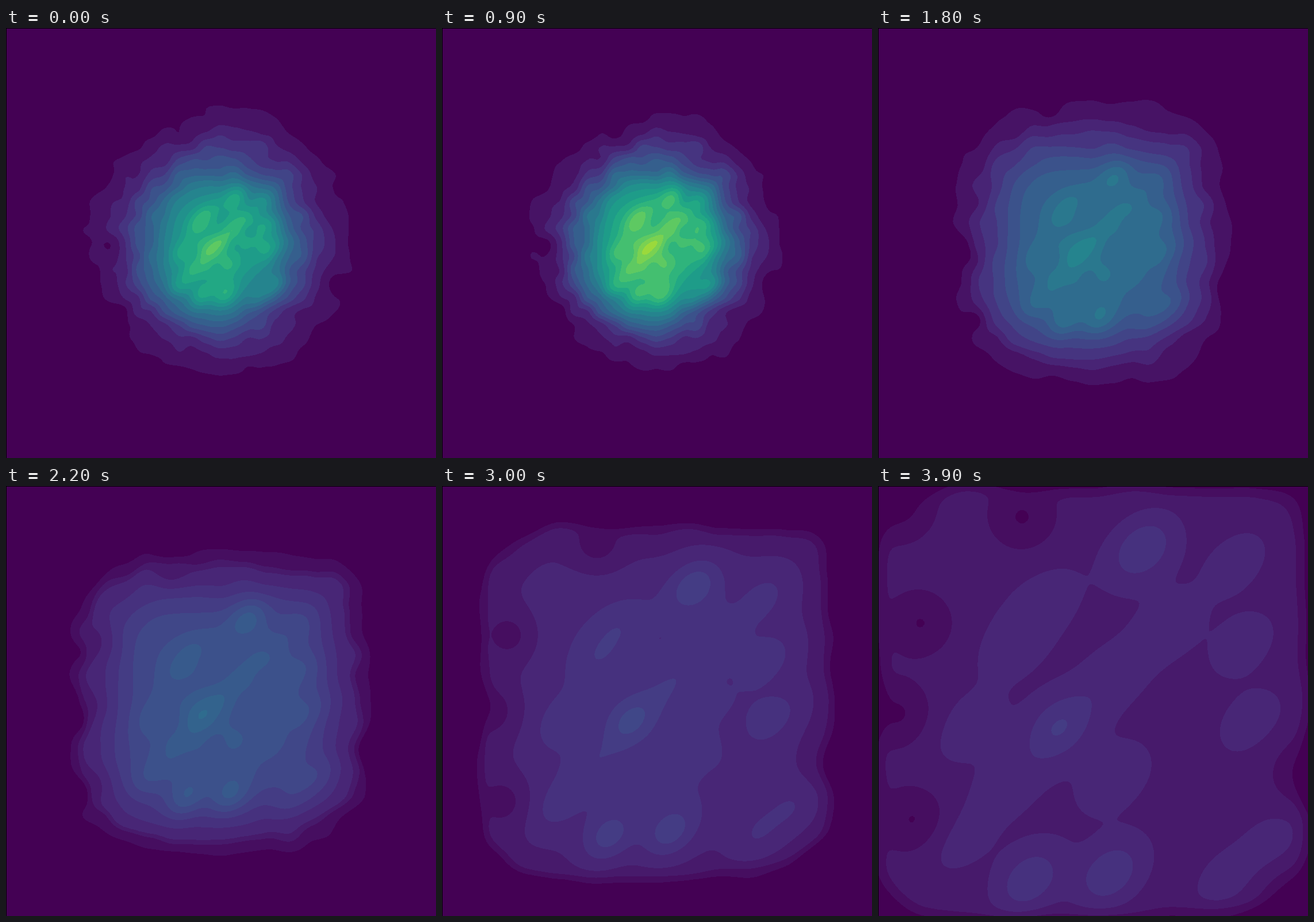
Animation, 748 px wide and 748 px high, one loop 4100 ms. Source, as an HTML page with a canvas:

```html
<!DOCTYPE html>
<html>
<head>
<meta charset="utf-8">
<style>
html, body { margin: 0; width: 100%; height: 100%; overflow: hidden; background: #440154; }
canvas { display: block; width: 748px; height: 748px; }
</style>
</head>
<body>
<canvas id="stage" width="748" height="748"></canvas>
<script>
const SIZE = 748, CELL = 4, GRID = SIZE / CELL + 1, CX = 372, CY = 373;
const ctx = document.getElementById('stage').getContext('2d');
const image = ctx.createImageData(SIZE, SIZE);
const pixels = new Uint32Array(image.data.buffer);
const field = new Float32Array(GRID * GRID);

const viridis = ('440154 471365 482475 463480 414487 3b528b 355f8d 2f6c8e 2a788e 25848e 21918c ' +
  '1e9c89 22a884 2fb47c 44bf70 5ec962 7ad151 9bd93c bddf26 dfe318 fde725').split(' ')
  .map(hex => [0, 2, 4].map(i => parseInt(hex.substr(i, 2), 16)));

// places reached at the end of the expansion
const bright = [[460, 108], [314, 420], [403, 675], [262, 686]];
const faint = [[405, 335], [502, 247], [225, 518], [140, 618], [152, 421], [408, 508],
  [600, 690], [690, 616], [655, 406], [640, 272], [625, 130], [235, 275], [290, 200]];
const dents = [[250, 55], [75, 238], [35, 395], [62, 580], [745, 500], [722, 720], [40, 40]];

const mix = (a, b, k) => a + (b - a) * k;
const clamp = v => Math.max(0, Math.min(1, v));

function hash(x, y) {
  let h = Math.imul(x, 374761393) + Math.imul(y, 668265263) + 91;
  h = Math.imul(h ^ h >>> 13, 1274126177);
  return ((h ^ h >>> 16) >>> 0) / 2147483648 - 1;
}

function noise(x, y) {
  const ix = Math.floor(x), iy = Math.floor(y);
  const ease = v => v * v * (3 - 2 * v), fx = ease(x - ix), fy = ease(y - iy);
  return mix(mix(hash(ix, iy), hash(ix + 1, iy), fx),
    mix(hash(ix, iy + 1), hash(ix + 1, iy + 1), fx), fy);
}

// a Gaussian bump, drawn out towards the upper right
function addBump(x, y, size, stretch, height) {
  const reach = size * stretch * 3.2;
  const x0 = Math.max(0, Math.ceil((x - reach) / CELL)), x1 = Math.min(GRID - 1, (x + reach) / CELL);
  const y0 = Math.max(0, Math.ceil((y - reach) / CELL)), y1 = Math.min(GRID - 1, (y + reach) / CELL);
  for (let j = y0; j <= y1; j++) for (let i = x0; i <= x1; i++) {
    const dx = i * CELL - x, dy = j * CELL - y;
    const along = (dx - dy) / stretch, across = (dx + dy) * Math.sqrt(stretch);
    field[j * GRID + i] += height * Math.exp(-(along * along + across * across) / (4 * size * size));
  }
}

function computeField(t) {
  // the cloud breathes in its trap until 1.2 s, then it is let go
  const free = Math.max(0, t - 1.2), breath = free ? 0 : Math.sin(Math.PI * t / 1.2);
  const spread = Math.max(0, (t - 1.3) / 2.6), fade = clamp(free / .8);
  const height = (.57 + .13 * breath) * Math.exp(-1.1 * free ** 1.27);
  const width = 155 - 5 * breath + 55 * free, falloff = 3 + .4 * t;
  const plateau = .067 * clamp(t - 1.4), half = 175 + 195 * spread, soft = 4 + 9 * spread;
  const power = 2 + 6 * spread, grain = 24 * (1 + 2 * spread), wobble = mix(13, 6, spread);

  for (let j = 0; j < GRID; j++) for (let i = 0; i < GRID; i++) {
    const x = i * CELL - CX, y = j * CELL - CY;
    const fine = noise(x / grain, y / grain), broad = noise(x / grain / 2.6 + 40, y / grain / 2.6);
    const norm = (Math.abs(x) ** power + Math.abs(y) ** power) ** (1 / power);
    const r = Math.max(0, norm + wobble * (fine + .8 * broad));
    field[j * GRID + i] = height * (1 + .08 * fine) * Math.exp(-((r / width) ** falloff)) +
      plateau * .5 * (1 - Math.tanh((r - half) / soft));
  }

  const scale = mix(.36, 1, spread);
  const addAll = (points, place, size, stretch, peak) => {
    for (const [x, y] of points)
      addBump(CX + (x - CX) * place, CY + (y - CY) * place, size * scale, stretch, peak);
  };
  const inner = mix(.3, 1, spread), outer = mix(.55, 1, spread);
  addAll(bright, inner, 38, 1.25, mix(.13, .08, fade));
  addAll(faint, inner, 38, 1.3, mix(.09, .032, fade));
  addAll(dents, outer, 40, 1, -.055 * mix(.5, 1, spread));
}

function levelColor(value) {
  const p = clamp(value) * 20, i = Math.min(19, Math.floor(p));
  const [r, g, b] = viridis[i].map((v, n) => Math.round(mix(v, viridis[i + 1][n], p - i)));
  return (255 << 24 | b << 16 | g << 8 | r) >>> 0;
}

function draw(t) {
  computeField(t);
  const step = t < .2 || (t > .85 && t < 2.2) ? .05 : .035;
  const colors = Array.from({ length: 40 }, (_, k) => levelColor(k * step));
  for (let y = 0; y < SIZE; y++) {
    const row = (y >> 2) * GRID, fy = (y & 3) / CELL;
    for (let x = 0; x < SIZE; x++) {
      const n = row + (x >> 2), fx = (x & 3) / CELL;
      const top = mix(field[n], field[n + 1], fx);
      const low = mix(field[n + GRID], field[n + GRID + 1], fx);
      const level = Math.round(mix(top, low, fy) / step);
      pixels[y * SIZE + x] = colors[Math.max(0, Math.min(39, level))];
    }
  }
  ctx.putImageData(image, 0, 0);
  ctx.fillStyle = '#000';
  ctx.fillRect(0, 0, SIZE, 1);
  ctx.fillRect(0, 0, 1, SIZE);
}

let shown = -1;
function tick() {
  const index = Math.min(39, Math.floor(performance.now() % 4100 / 100));
  if (index !== shown) draw((shown = index) / 10);
  requestAnimationFrame(tick);
}
tick();
</script>
</body>
</html>
```
